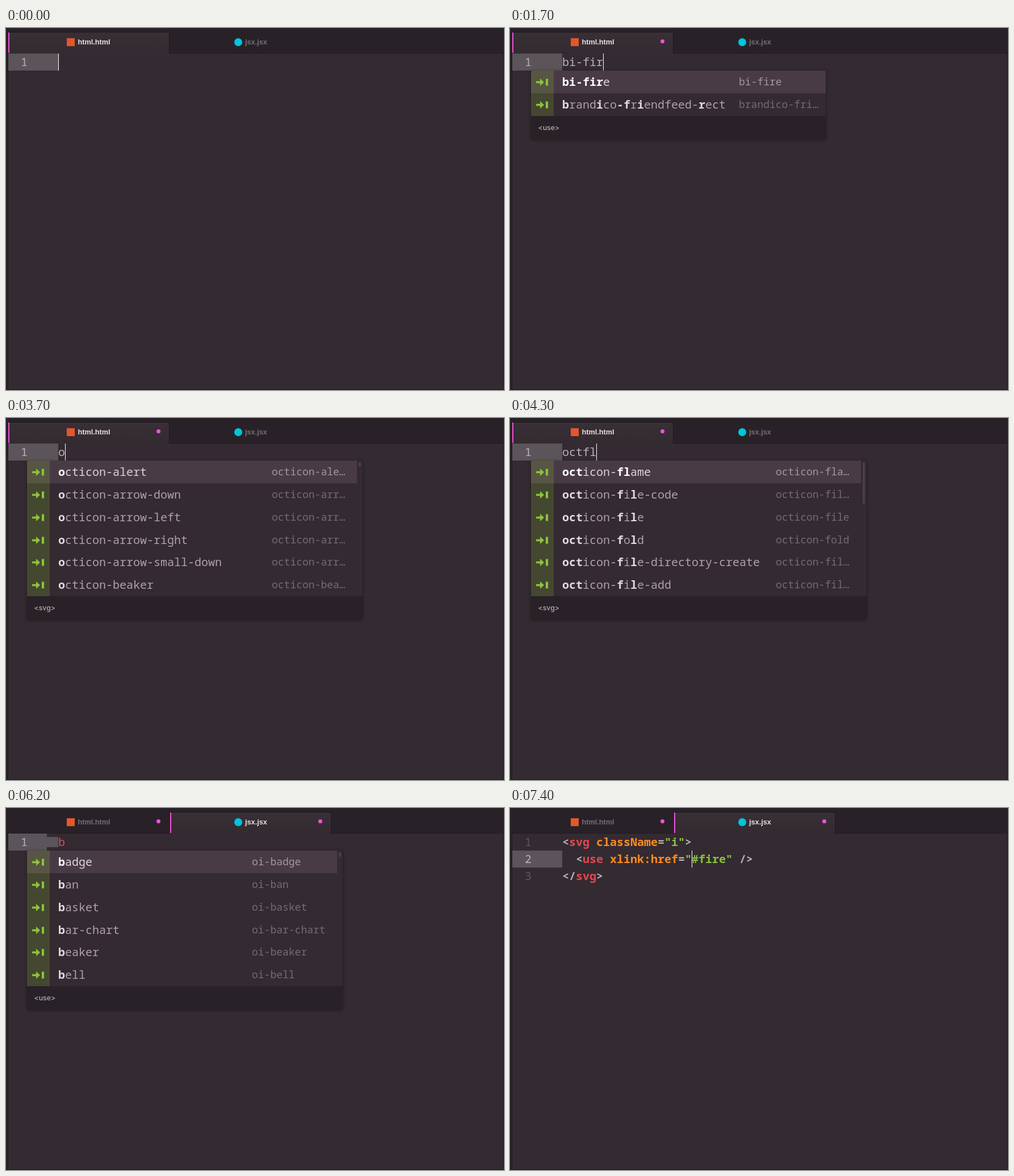
Recreate the animation shown at these times as an HTML page. Size 877 px wide and 638 px high, loop 8 s.

```html
<!DOCTYPE html>
<html lang="en">
<head>
<meta charset="utf-8">
<title>Icon snippets</title>
<style>
html, body { margin: 0; width: 100%; height: 100%; overflow: hidden; background: #282228; }
#stage { position: relative; width: 877px; height: 638px; overflow: hidden; background: #282228;
  font: 400 20px/30px "Noto Sans Mono", "DejaVu Sans Mono", monospace; font-variant-ligatures: none; }
#stage div, #stage svg { position: absolute; box-sizing: border-box; white-space: pre; }
.pane { left: 3px; top: 44px; width: 873px; height: 594px; background: #342a31;
  border: 1px solid #1f1a1e; border-right-color: #2b2329; }
.tab { top: 7px; height: 37px; font: 700 12.7px/37px "Liberation Sans", Arial, sans-serif; color: #776d75; }
.tab.on { height: 38px; color: #e6dfe5; background: linear-gradient(#383036, #342a31);
  border: solid #1f1a1e; border-width: 1px 1px 0 0; border-radius: 0 3px 0 0; line-height: 35px; }
.tab.on::before { content: ""; position: absolute; left: 0; top: 0; width: 2px; height: 36px; background: #f250da; }
.mark { background: #e5562b; width: 14px; height: 14px; top: 18px; left: 107px; }
.mark.round { background: #00c4dc; left: 402px; border-radius: 50%; }
.dot { width: 7px; height: 7px; top: 20px; border-radius: 50%; background: #f250da; }
.hl { background: #5b545a; }
.num { left: 26px; color: #5f565d; }
.num.lit { color: #b9b2b9; }
.line { left: 92px; font-weight: 500; color: #b9b2b9; }
.line.code { font-weight: 600; }
.cursor { width: 1px; height: 30px; background: #fff; }
.tag { color: #e0484f; } .attr { color: #fd8b1f; } .str { color: #86c13d; }
.menu { left: 37px; top: 75px; border-radius: 3px; overflow: hidden; background: #342a31;
  box-shadow: 0 1px 5px rgba(0, 0, 0, .45); }
.row { left: 0; height: 39.85px; line-height: 39px; font-weight: 500; color: #b0a0ad; }
.row.first { background: #493b46; color: #ddd2da; }
.row b { color: #e2d8e0; font-weight: 700; }
.row.first b { color: #fff; }
.icon { left: 0; top: 0; width: 40px; height: 100%; background: #454830; }
.first .icon { background: #575643; }
.icon svg { left: 9px; top: 13px; fill: #8cc33c; }
.name { left: 55px; }
.hint { font-size: 18px; color: #766b74; }
.first .hint { color: #a296a0; }
.bar { top: 3px; width: 4.5px; border-radius: 2px; background: #4b3f49; }
.foot { left: 0; width: 100%; height: 41px; padding-left: 12.5px; background: #282127; color: #b5abb3;
  font: 500 12.3px/41px Inter, "Liberation Sans", sans-serif; }
</style>
</head>
<body>
<div id="stage"></div>
<script>
const stage = document.getElementById('stage');
const LOOP = 8000, CHAR = 12, LINE = 30, LEFT = 92, TOP = 45, ROW = 39.85;

const esc = s => s.replace(/&/g, '&amp;').replace(/</g, '&lt;').replace(/>/g, '&gt;');
const box = (cls, style, body = '') => `<div class="${cls}" style="${style}">${body}</div>`;
const area = (x, y, w, h) => `left:${x}px;top:${y}px;width:${w}px;height:${h}px`;

// Completion lists
const names = (prefix, list) => list.split(' ').map(s => prefix + s);
const letters = names('', 'badge ban basket bar-chart beaker bell');
const anyBi = names('bi-', 'activity alert archive arrow-bottom arrow-left arrow-right');
const biF = names('bi-', 'fire flag folder folder-open forward fullscreen');
const friends = names('brandico-friendfeed', '-rect');
const biFi = [...names('bi-', 'fire file film fish'), 'brandico-friendfeed', ...friends];
const octs = names('octicon-', 'alert arrow-down arrow-left arrow-right arrow-small-down beaker');
const octF = names('octicon-', 'file fold flame file-code file-directory-create file-add');
const octFl = names('octicon-', 'flame file-code file fold file-directory-create file-add');
const octFla = names('octicon-', 'flame file-add file-media file-binary file-directory file-symlink-file');

// hint: x of the right column, end: right edge of rows, thumb: scrollbar height
const wide = { hint: 433, end: 583, max: 12, foot: '<use>', thumb: 8 };
const octMenu = { hint: 468, end: 618, max: 12, foot: '<svg>', thumb: 20 };
const menus = {
  b: { ...wide, rows: letters, prefix: 'oi-' },
  bi: { ...wide, rows: anyBi, thumb: 40 },
  'bi-': { ...wide, rows: anyBi, thumb: 44 },
  'bi-f': { ...wide, rows: biF, thumb: 120 },
  'bi-fi': { ...wide, rows: biFi, hint: 415, end: 568, max: 13, thumb: 0 },
  'bi-fir': { ...wide, rows: ['bi-fire', friends[0]], hint: 403, end: 556, max: 13, thumb: 0 },
  o: { ...octMenu, rows: octs, thumb: 8 },
  oc: { ...octMenu, rows: octs },
  oct: { ...octMenu, rows: octs, thumb: 24 },
  octf: { ...octMenu, rows: octF, thumb: 48 },
  octfl: { ...octMenu, rows: octFl, thumb: 73 },
  octfla: { ...octMenu, rows: octFla, thumb: 110 },
  octflam: { ...octMenu, rows: ['octicon-flame'], thumb: 0 }
};

// Timeline
const snippet = (attrs, id) => [`<svg ${attrs}>`, `  <use xlink:href="#${id}" />`, '</svg>'];
const fire = snippet('class="i"', 'fire');
const flame = snippet('version="1.1" width="24" height="32" viewBox="0 0 12 16" class="octicon"', 'flame');
const fireJsx = snippet('className="i"', 'fire');
const typing = (text, times, extra) =>
  times.map((t, i) => ({ t, typed: text.slice(0, i + 1), ...extra }));

const states = [
  { t: 0, typed: '' },
  ...typing('bi-fir', [1000, 1100, 1300, 1400, 1600, 1700]),
  { t: 2200, lines: fire, cursor: [1, 19] },
  { t: 3200, lines: fire, cursor: [2, 6], selected: true },
  ...typing('octflam', [3700, 3800, 4000, 4100, 4300, 4500, 4600]),
  { t: 4700, lines: flame },
  { t: 5700, typed: '', jsx: true },
  ...typing('bi-fir', [6200, 6300, 6400, 6600, 6700, 6900], { jsx: true }),
  { t: 7400, lines: fireJsx, cursor: [1, 19], jsx: true }
];

// Drawing
function paint(line) {
  const token = /("[^"]*")|(<\/?)(\w+)|([\w:]+)(?==)/g;
  let out = '', last = 0;
  for (const m of line.matchAll(token)) {
    out += esc(line.slice(last, m.index));
    if (m[1]) out += `<span class="str">${m[1]}</span>`;
    else if (m[2]) out += `${esc(m[2])}<span class="tag">${m[3]}</span>`;
    else out += `<span class="attr">${m[4]}</span>`;
    last = m.index + m[0].length;
  }
  return out + esc(line.slice(last));
}

function fuzzy(name, query) {
  let k = 0;
  return [...name].map(c => c === query[k] ? (k++, `<b>${c}</b>`) : c).join('');
}

function tabs(s) {
  const tab = (x, w, pad, text, on) =>
    box('tab' + (on ? ' on' : ''), `left:${x}px;width:${w}px;padding-left:${pad}px`, text);
  return tab(4, 284, 122.5, 'html.html', !s.jsx) + tab(289, 284, 132, 'jsx.jsx', s.jsx) +
    box('mark', '') + box('mark round', '') +
    (s.t >= 1000 ? box('dot', 'left:265px') : '') +
    (s.t >= 6200 ? box('dot', 'left:550px') : '');
}

function menu(query) {
  const m = menus[query];
  const arrow = '<svg width="22" height="15"><path d="M0 5.7H7V1L14 7.5 7 14V9.3H0ZM17 1.5h4v12h-4z"/></svg>';
  const rows = m.rows.map((name, i) => {
    const full = (m.prefix || '') + name;
    const hint = full.length > m.max ? full.slice(0, m.max - 1) + '…' : full;
    return box('row' + (i ? '' : ' first'), `top:${i * ROW}px;width:${m.end - 37}px`,
      box('icon', '', arrow) + box('name', '', fuzzy(name, query)) +
      box('hint', `left:${m.hint - 37}px`, hint));
  }).join('');
  const h = m.rows.length * ROW, w = m.end - 37 + (m.thumb ? 10 : 0);
  return box('menu', `width:${w}px;height:${h + 41}px`, rows +
    box('foot', `top:${h}px`, esc(m.foot)) +
    (m.thumb ? box('bar', `left:${w - 7.5}px;height:${m.thumb}px`) : ''));
}

function editor(s) {
  const lines = s.lines || [s.typed];
  const active = s.lines ? 1 : 0;
  const lone = s.jsx && s.typed === 'b';
  let out = '';
  if (s.selected) {
    out += box('hl', area(4, TOP, 873, 60)) + box('hl', area(4, TOP + 60, 160, LINE));
  } else if (lone) {
    out += box('hl', area(4, TOP, 68, LINE)) + box('hl', area(72, 51, 20, 18));
  } else {
    out += box('hl', area(4, TOP + active * LINE, 88, LINE));
  }
  lines.forEach((line, i) => {
    const top = `top:${TOP + i * LINE}px`;
    const lit = s.selected || i === active;
    out += box('num' + (lit ? ' lit' : ''), top, i + 1);
    out += box('line' + (s.lines ? ' code' : s.jsx ? ' tag' : ''), top, paint(line));
  });
  const cursor = s.cursor || (!s.lines && !lone && [0, s.typed.length]);
  if (cursor) {
    const [row, col] = cursor;
    out += box('cursor', `left:${LEFT + col * CHAR}px;top:${TOP + row * LINE}px`);
  }
  return out;
}

let shown = null;
function frame(now) {
  const t = now % LOOP;
  const s = states.findLast(x => x.t <= t);
  if (s !== shown) {
    shown = s;
    stage.innerHTML = box('pane', '') + tabs(s) + editor(s) + (s.typed ? menu(s.typed) : '');
  }
  requestAnimationFrame(frame);
}
frame(performance.now());
</script>
</body>
</html>
```
